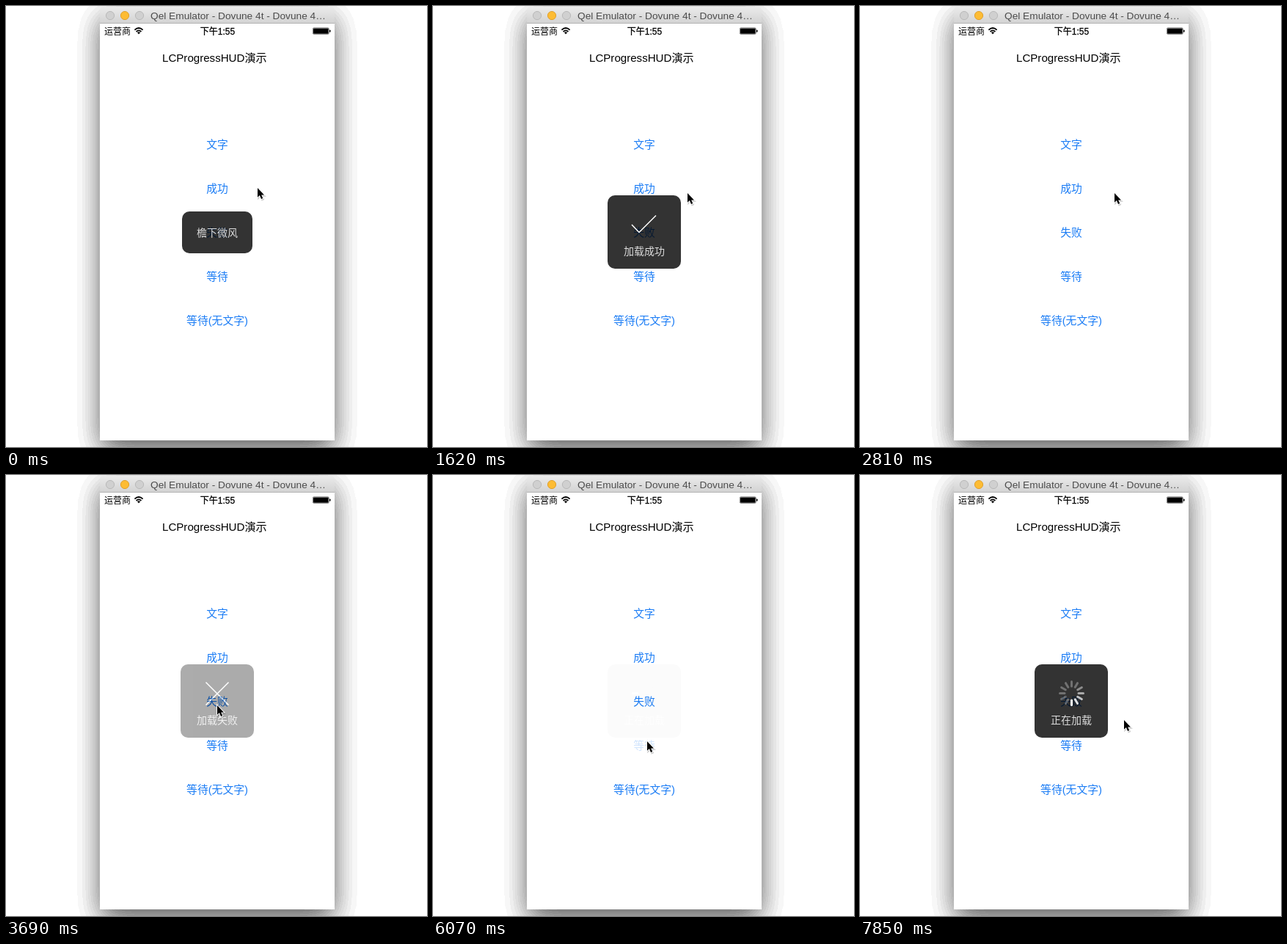
Recreate the animation shown at these times as an HTML page. Size 574 by 601 pixels, loop 8 s.

```html
<!DOCTYPE html>
<html lang="zh-CN">
<head>
<meta charset="utf-8">
<title>LCProgressHUD演示</title>
<style>
  html, body { margin: 0; width: 100%; height: 100%; overflow: hidden; background: #fff; }
  svg { display: block; width: 574px; height: 601px; }
  text { font-family: "Liberation Sans", "Noto Sans CJK SC", "Noto Sans CJK", sans-serif; }
  .mid { text-anchor: middle; }
  .button { font-size: 14.8px; fill: #1c7df5; }
  .label { font-size: 14px; fill: #dcdcdc; }
  .icon { fill: none; stroke: #fff; stroke-width: 1.5; }
</style>
</head>
<body>
<svg viewBox="0 0 574 601">
  <defs>
    <filter id="bands" filterUnits="userSpaceOnUse" x="0" y="-70" width="574" height="780" color-interpolation-filters="sRGB">
      <feGaussianBlur stdDeviation="19.5"/>
      <feComponentTransfer><feFuncA id="steps" type="discrete"/></feComponentTransfer>
    </filter>
    <linearGradient id="bar" x2="0" y2="1">
      <stop stop-color="#ebebeb"/><stop offset="1" stop-color="#d2d2d2"/>
    </linearGradient>
    <path id="arrow" d="M0 0V12.800L2.900 10L5 15L7.200 14.100L5.200 9.400H9Z"/>
  </defs>

  <rect x="128" y="15" width="320" height="591" filter="url(#bands)"/>
  <rect x="128" y="22" width="320" height="570" fill="#fff"/>
  <path d="M128 24V6Q128 1 133 1H443Q448 1 448 6V24Z" fill="url(#bar)"/>
  <path d="M128 23.5H448" stroke="#b4b4b4"/>
  <g fill="#d0d0d0" stroke="#b9b9b9">
    <circle cx="142" cy="13" r="5.6"/>
    <circle cx="162" cy="13" r="5.6" fill="#fdbc34" stroke="#e0a02c"/>
    <circle cx="182" cy="13" r="5.6"/>
  </g>
  <text x="197" y="18" font-size="13.7" fill="#4c4c4c">Qel Emulator - Dovune 4t - Dovune 4…</text>

  <text x="134" y="38.5" font-size="12">运营商</text>
  <g fill="none" stroke="#000" stroke-width="1.8">
    <path d="M175.4 32.6Q181 27.4 186.6 32.6M177.6 35Q181 31.6 184.4 35"/>
    <path d="M179 36.2Q181 34.4 183 36.2L181 38.6Z" fill="#000" stroke="none"/>
  </g>
  <text class="mid" x="288.5" y="38.5" font-size="12" stroke="#000" stroke-width=".3">下午1:55</text>
  <rect x="418.3" y="29.8" width="22" height="8.6" rx="1.5" fill="none" stroke="#000" stroke-width=".5"/>
  <rect x="419" y="30.5" width="20.6" height="7.2" rx=".8"/>
  <rect x="441" y="32.5" width="1.5" height="3.2" rx=".7"/>
  <text x="213" y="75.5" font-size="15.1">LCProgressHUD演示</text>

  <g id="buttons"></g>
  <g id="hud">
    <rect id="panel" rx="10" fill-opacity=".8"/>
    <path id="check" class="icon" d="M271 298L281 308.500L304 285.500"/>
    <path id="cross" class="icon" d="M272.500 282.500L303.500 313.500M303.500 282.500L272.500 313.500"/>
    <g id="spinner" stroke="#fff" stroke-width="3" stroke-linecap="round"></g>
    <text id="message" class="label mid" x="288"></text>
  </g>
  <g id="cursor">
    <use href="#arrow" x="1" y="1.5" opacity=".2" stroke="#000" stroke-width="1.6"/>
    <use href="#arrow" stroke="#fff" stroke-width="1.8"/>
    <use href="#arrow"/>
  </g>
</svg>
<script>
const LOOP = 8000, TICK = 148.1, FADE = 350;
const $ = id => document.getElementById(id);
const clamp = value => Math.min(1, Math.max(0, value));

function add(parent, name, attributes, text = "") {
  const node = document.createElementNS("http://www.w3.org/2000/svg", name);
  for (const key in attributes) node.setAttribute(key, attributes[key]);
  node.textContent = text;
  return parent.appendChild(node);
}

// The window shadow falls off in visible steps.
$("steps").setAttribute("tableValues", Array.from({ length: 20 }, (_, i) => i * .034).join(" "));

const buttons = ["文字", "成功", "失败", "等待", "等待(无文字)"].map((label, i) =>
  add($("buttons"), "text", { class: "button mid", x: 288, y: 193.5 + 60 * i }, label));

const spokes = Array.from({ length: 12 }, (_, i) =>
  add($("spinner"), "path", { d: "M0 -9.500V-16", transform: `translate(288.5 297.5) rotate(${i * 30})` }));

// Each HUD belongs to the button with the same index; times are in ms.
const huds = [
  { message: "檐下微风", show: -FADE, hide: 320 },
  { message: "加载成功", icon: "check", show: 1270, hide: 2390 },
  { message: "加载失败", icon: "cross", show: 3560, hide: 4767 },
  { message: "正在加载", icon: "spinner", show: 6065, hide: LOOP },
];

const cursorStart = { x: 343, y: 248 };
const cursorMoves = [
  { from: 440, to: 1030, x: 293, y: 246 },
  { from: 1330, to: 1620, x: 347, y: 255 },
  { from: 2810, to: 3540, x: 288, y: 314 },
  { from: 3700, to: 4140, x: 391, y: 315 },
  { from: 5180, to: 5920, x: 292, y: 363 },
  { from: 6220, to: 6960, x: 360, y: 334 },
];

function cursorAt(time) {
  let { x, y } = cursorStart;
  for (const move of cursorMoves) {
    const p = clamp((time - move.from) / (move.to - move.from));
    const eased = p * p * (3 - 2 * p);
    x += (move.x - x) * eased;
    y += (move.y - y) * eased;
  }
  return [Math.round(x), Math.round(y)];
}

function drawSpinner(time) {
  const head = Math.round(time * 12 / 1000) + 8;
  spokes.forEach((spoke, i) => {
    const age = (head - i + 12) % 12;
    spoke.setAttribute("opacity", Math.max(.3, 1 - .14 * age));
  });
}

function drawHud(time) {
  const hud = huds.findLast(item => item.show <= time);
  const width = hud.icon ? 100 : 96, height = hud.icon ? 100 : 57;
  const box = { x: 288 - width / 2, y: 308 - Math.floor(height / 2), width, height };
  for (const key in box) $("panel").setAttribute(key, box[key]);
  for (const id of ["check", "cross", "spinner"]) $(id).style.display = id === hud.icon ? "" : "none";
  $("message").textContent = hud.message;
  $("message").setAttribute("y", hud.icon ? 339 : 313.5);
  $("hud").setAttribute("opacity", clamp((time - hud.show) / FADE) * clamp(1 - (time - hud.hide) / FADE));
}

function draw(now) {
  // The screen refreshes once per tick.
  const time = Math.floor((now % LOOP + 15) / TICK) * TICK;
  buttons.forEach((button, i) => {
    const pressed = huds[i] && Math.abs(time - huds[i].show) < TICK / 2;
    button.setAttribute("opacity", pressed ? .2 : 1);
  });
  drawHud(time);
  drawSpinner(time);
  $("cursor").setAttribute("transform", `translate(${cursorAt(time)})`);
}

const start = performance.now();
function loop() {
  draw(performance.now() - start);
  requestAnimationFrame(loop);
}
loop();
</script>
</body>
</html>
```
